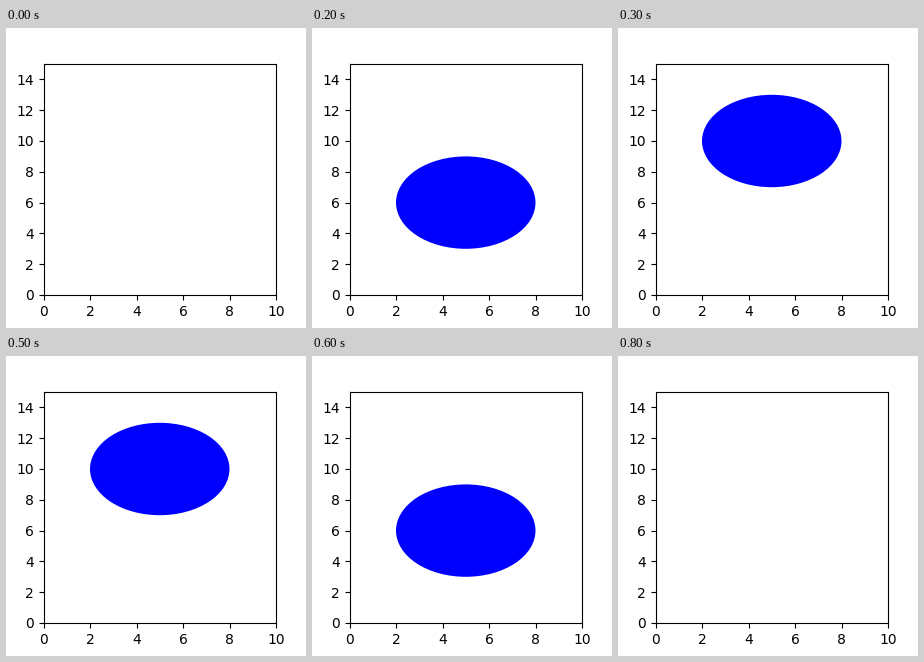
Recreate the animation shown at these times as a matplotlib script. Size 300 px wide and 300 px high, loop 4.39 s.

```python
import matplotlib.pyplot as plt
from matplotlib.animation import FuncAnimation
from matplotlib.patches import Circle

LOOP_MS = 4390
TICK_MS = 10
STEP_MS = 100
HIDDEN_Y = -8

fig = plt.figure(figsize=(3, 3), dpi=100)
ax = fig.add_axes([0.125, 0.11, 0.775, 0.77])
ax.set(xlim=(0, 10), ylim=(0, 15), xticks=range(0, 11, 2), yticks=range(0, 15, 2))

ball = ax.add_patch(Circle((5, HIDDEN_Y), 3, facecolor="blue", edgecolor="none"))


def height(step):
    """A toss in whole steps: 0, 6, 10, 12, 10, 6, 0, then out of view."""
    distance = abs(step - 4)
    return 12 - distance * (distance + 1) if distance < 4 else HIDDEN_Y


def update(frame):
    ball.center = 5, height(frame * TICK_MS // STEP_MS)
    return (ball,)


anim = FuncAnimation(fig, update, frames=LOOP_MS // TICK_MS,
                     interval=TICK_MS, repeat=True, repeat_delay=0)
plt.show()
```
